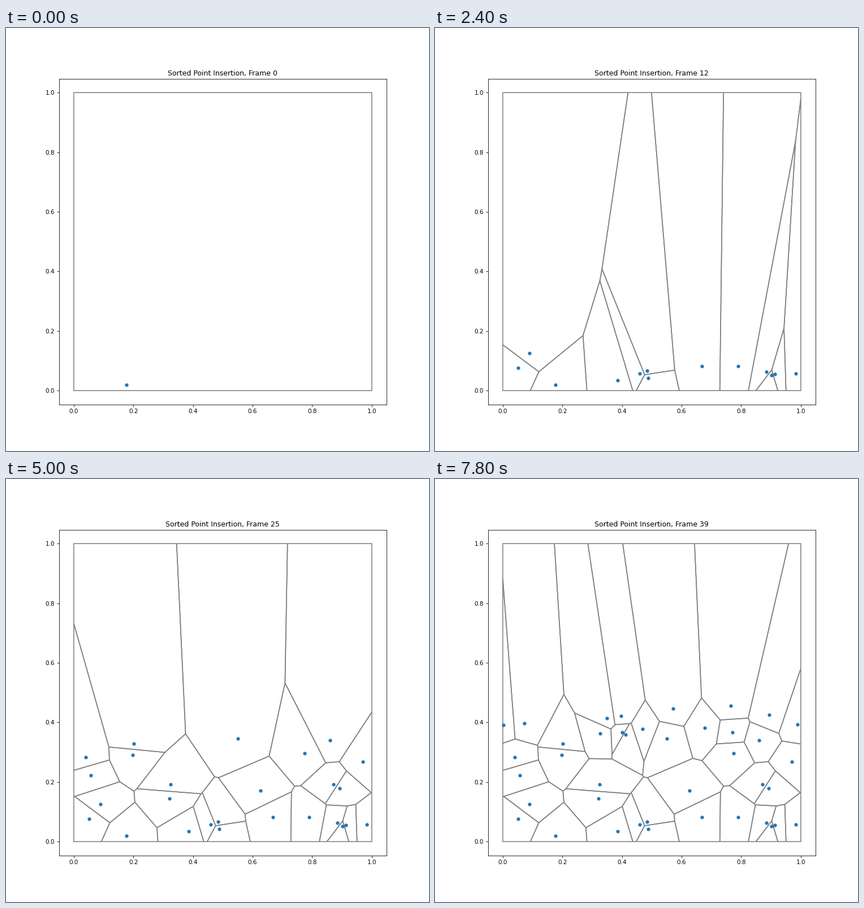
Animation, 748 px wide and 748 px high, one loop 8 s. Source, as a matplotlib script:

```python
import matplotlib.pyplot as plt
from matplotlib.animation import FuncAnimation
from matplotlib.collections import LineCollection
from matplotlib.patches import Rectangle

SIZE, DPI = 748, 74.8
UNIT, LEFT, BASE = 527.0, 119.85, 641.24  # unit square on the stage, in pixels

# Sites in stage pixels, lowest first
SITES = [
    (212.6, 630.6), (322.6, 622.8), (377.2, 618.8), (594.7, 614.2),
    (601.3, 612.25), (638.2, 611.05), (362.3, 610.9), (586.4, 607.85),
    (375.2, 605.7), (147.4, 601.2), (536.4, 598.4), (472.0, 597.6),
    (167.0, 575.0), (288.6, 565.0), (449.6, 551.3), (589.6, 546.8),
    (579.2, 540.1), (290.6, 539.6), (150.2, 523.5), (630.7, 499.8),
    (141.0, 491.9), (224.2, 488.4), (528.4, 484.6), (226.2, 467.7),
    (573.0, 461.9), (410.2, 459.0), (337.4, 451.9), (292.0, 449.8),
    (526.0, 448.4), (330.8, 448.15), (366.7, 442.1), (476.8, 440.4),
    (121.4, 434.8), (641.2, 434.0), (157.8, 432.0), (303.9, 422.8),
    (328.6, 419.1), (591.2, 417.0), (421.1, 405.8), (522.9, 401.2),
]
POINTS = [((x - LEFT) / UNIT, (BASE - y) / UNIT) for x, y in SITES]
SQUARE = [(0, 0), (1, 0), (1, 1), (0, 1)]


def clip(poly, p, q):
    """Keep the part of poly that is nearer to p than to q."""
    nx, ny = q[0] - p[0], q[1] - p[1]
    c = (nx * (p[0] + q[0]) + ny * (p[1] + q[1])) / 2
    dist = [nx * x + ny * y - c for x, y in poly]
    if max(dist) <= 0:
        return poly
    out = []
    for i, b in enumerate(poly):
        a, da, db = poly[i - 1], dist[i - 1], dist[i]
        if (da > 0) != (db > 0):
            t = da / (da - db)
            out.append((a[0] + t * (b[0] - a[0]), a[1] + t * (b[1] - a[1])))
        if db <= 0:
            out.append(b)
    return out


def inside(a, b):
    mid = (a[0] + b[0]) / 2, (a[1] + b[1]) / 2
    return all(1e-9 < m < 1 - 1e-9 for m in mid)


def cell_edges(points):
    edges = []
    for p in points:
        poly = SQUARE
        for q in points:
            if q is not p:
                poly = clip(poly, p, q)
        for i, b in enumerate(poly):
            if inside(poly[i - 1], b):
                edges.append((poly[i - 1], b))
    return edges


fig, ax = plt.subplots(figsize=(SIZE / DPI, SIZE / DPI), dpi=DPI)
fig.subplots_adjust(left=0.125, right=0.9, bottom=0.11, top=0.88)
half = 0.55 * 0.77 / 0.775  # same scale on both axes
ax.set_xlim(-0.05, 1.05)
ax.set_ylim(0.5 - half, 0.5 + half)

walls = LineCollection([], colors="gray", linewidths=1.5, zorder=2)
ax.add_collection(walls, autolim=False)
ax.add_patch(Rectangle((0, 0), 1, 1, fill=False, ec="gray", lw=1.5,
                       snap=False, zorder=2.1))
dots, = ax.plot([], [], "o", color="tab:blue", ms=5, zorder=3)
title = ax.set_title("")


def update(k):
    shown = POINTS[:k + 1]
    walls.set_segments(cell_edges(shown))
    dots.set_data(*zip(*shown))
    title.set_text(f"Sorted Point Insertion, Frame {k}")
    return walls, dots, title


anim = FuncAnimation(fig, update, frames=len(POINTS), interval=200,
                     repeat=True, repeat_delay=0)
plt.show()
```
